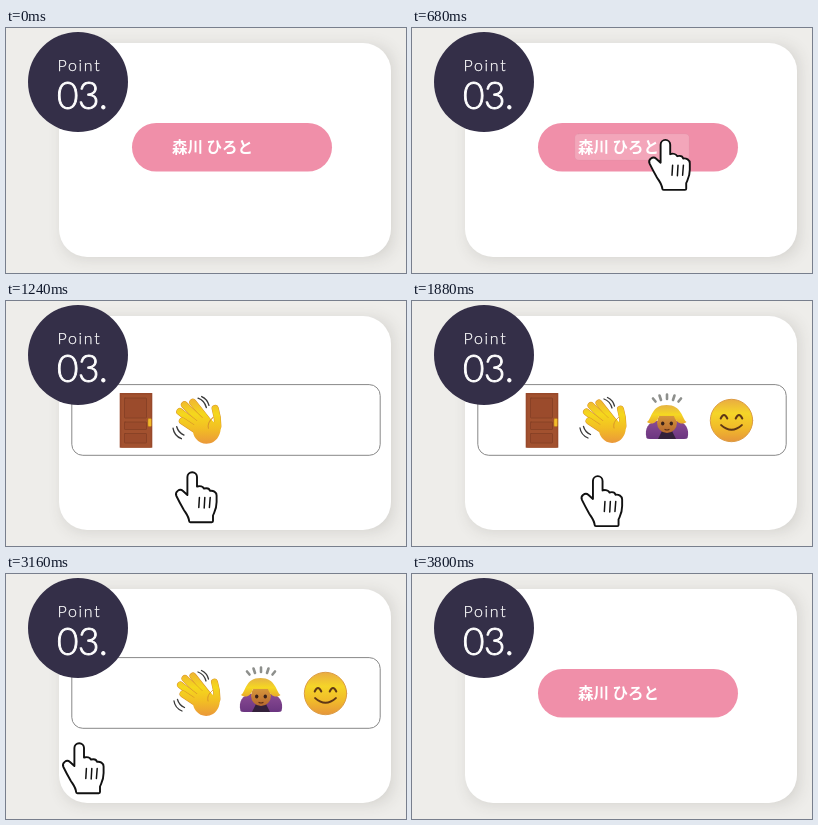
Write an HTML page with a canvas that moves like this. It is 400x245 px and loops after 4000 ms.

```html
<!DOCTYPE html>
<html lang="ja">
<head>
<meta charset="utf-8">
<title>Point 03</title>
<style>
html, body { margin: 0; width: 100%; height: 100%; overflow: hidden; background: #eeedea; }
canvas { display: block; width: 400px; height: 245px; }
</style>
</head>
<body>
<canvas id="stage"></canvas>
<script>
const W = 400, H = 245, LOOP = 4000, TICK = 40;
const canvas = document.getElementById('stage');
const dpr = window.devicePixelRatio || 1;
canvas.width = W * dpr;
canvas.height = H * dpr;
const ctx = canvas.getContext('2d');

const clamp = v => Math.max(0, Math.min(1, v));
const progress = (t, start, length) => clamp((t - start) / length);
const easeInOut = p => p < .5 ? 4 * p ** 3 : 1 - (2 - 2 * p) ** 3 / 2;
const easeOutBack = p => 1 + 1.83 * (p - 1) ** 3 + .83 * (p - 1) ** 2;

// Shape helpers
function rect(x, y, w, h, r, fill, stroke, width = 1) {
  ctx.beginPath();
  ctx.roundRect(x, y, w, h, r);
  paint(fill, stroke, width);
}

function paint(fill, stroke, width) {
  if (fill) { ctx.fillStyle = fill; ctx.fill(); }
  if (stroke) { ctx.strokeStyle = stroke; ctx.lineWidth = width; ctx.stroke(); }
}

function oval(x, y, rx, ry, fill, stroke, width) {
  ctx.beginPath();
  ctx.ellipse(x, y, rx, ry, 0, 0, 7);
  paint(fill, stroke, width);
}

function arc(x, y, r, from, to, color, width) {
  ctx.beginPath();
  ctx.arc(x, y, r, from, to);
  paint(null, color, width);
}

function shape(d, fill, stroke, width) {
  const path = new Path2D(d);
  if (fill) { ctx.fillStyle = fill; ctx.fill(path); }
  if (stroke) { ctx.strokeStyle = stroke; ctx.lineWidth = width; ctx.stroke(path); }
}

function shade(y0, y1, ...colors) {
  const g = ctx.createLinearGradient(0, y0, 0, y1);
  colors.forEach((c, i) => g.addColorStop(i / (colors.length - 1), c));
  return g;
}

function text(str, x, y, font, spacing = 0, outline = 0) {
  ctx.font = font;
  ctx.letterSpacing = spacing + 'px';
  ctx.fillStyle = ctx.strokeStyle = '#fff';
  ctx.fillText(str, x, y);
  if (outline) {
    ctx.lineWidth = outline;
    ctx.strokeText(str, x, y);
  }
}

function scaled(cx, cy, s, draw) {
  ctx.save();
  ctx.translate(cx, cy);
  ctx.scale(s, s);
  ctx.translate(-cx, -cy);
  draw();
  ctx.restore();
}

// Scene parts
function card() {
  ctx.fillStyle = '#eeedea';
  ctx.fillRect(0, 0, W, H);
  ctx.save();
  ctx.shadowColor = 'rgba(60,55,45,.2)';
  ctx.shadowBlur = 18 * dpr;
  ctx.shadowOffsetX = 3 * dpr;
  ctx.shadowOffsetY = 2 * dpr;
  rect(57, 19, 324, 206, 16, '#fff');
  ctx.restore();
  rect(53, 15, 332, 214, 28, '#fff');
}

function badge() {
  oval(72, 54, 50, 50, '#342f48');
  text('Point', 51.5, 42.6, '300 16px Lato, sans-serif', 1.7, .25);
  text('03.', 51, 81, '300 37px Lato, sans-serif', -.4, .9);
}

function pill() {
  rect(126, 95, 200, 48.5, 24.25, '#f08fa9');
  text('森川 ひろと', 166, 125, '700 15.5px "Noto Sans CJK JP", "Noto Sans CJK", sans-serif');
}

function panel(p) {
  ctx.globalAlpha = clamp(p * 1.8);
  scaled(220, 119, easeOutBack(p), () =>
    rect(65.8, 83.6, 308.4, 70.7, 11, '#fff', '#888'));
  ctx.globalAlpha = 1;
}

function door() {
  rect(113.7, 92, 32.6, 54.8, .5, '#98492b');
  rect(115.2, 93.5, 29.6, 53, .5, '#a2512f');
  for (const [y, h] of [[97, 20], [121, 7.5], [132.5, 9.5]]) {
    rect(118.5, y, 22, h, .5, '#9b4b2c', '#843f25', .8);
  }
  rect(142, 117.5, 3.4, 8, 1, '#f3bc2c', '#b97c16', .5);
}

function wave() {
  const skin = shade(99, 142, '#efb532', '#f5d81c', '#f2bd24', '#ea983a');
  const fingers = [
    'M211 125Q211 116 208.5 108', 'M202 121L187 102', 'M198 123L179 104.5',
    'M195 127L174.5 111', 'M195 132L177 120'
  ];
  for (const d of fingers) {
    shape(d, null, '#d9952a', 7);
    shape(d, null, skin, 6);
  }
  shape('M191 120C196 115 203 116 207 121L213.5 122C215 130 212 137 207 140C201 143.5 194 142 190 137C186 132 186 125 191 120Z', skin);
  shape('M206.5 116.5C202.5 120 201 123 202 127', null, '#d9952a', 1);
  shape('M192 98Q198 100 200 107M195.5 96.5Q201 99 202.5 105M168 127Q169 134 176 137M171.5 125.5Q173 131 178.5 133.5',
    null, '#3a3a3a', 1.3);
}

function bow() {
  shape('M234.5 137C232 127 237 121 244 120H266C273 121 278 128 275.5 137Q275 138 272 138H238Q235 138 234.5 137Z',
    shade(120, 138, '#8a4b93', '#6b3580'));
  shape('M246 138L250 130H260L264 138Z', '#33203a');
  oval(255, 121.5, 10, 10.5, shade(111, 132, '#dea03e', '#b5682f'));
  shape('M235 121C240 118 239 104 254.5 104C270 104 270 118 274.5 121C270 124.5 264 122 262 115H247C245 122 240 124.5 235 121Z',
    shade(104, 123, '#e5b345', '#f5d722', '#e9a92b'));
  oval(250.7, 122.5, 1.7, 1.9, '#39211a');
  oval(259.3, 122.5, 1.7, 1.9, '#39211a');
  shape('M253 128.5Q255 129.5 257 128.5', null, '#5d2d18', 1.2);
  shape('M241 97.5L243.5 100.5M247.5 94.5L249 99M255 93.5V98M262.5 94.5L261 99M269 97.5L266.5 100.5',
    null, '#8d8f8c', 2.6);
}

function smile() {
  oval(319.5, 119.5, 21.2, 21.2, shade(98, 141, '#e9ab42', '#f5d528', '#f1bb2a', '#e6953a'), '#dc9c45', 1);
  shape('M308.7 117.5Q312 110.5 315.3 117.5M323.7 117.5Q327 110.5 330.3 117.5', null, '#5f3716', 2);
  shape('M309 124Q319.5 133.5 330 124', null, '#5f3716', 1.7);
}

const emojis = [
  [door, 130, 119], [wave, 191, 120], [bow, 255, 115], [smile, 319.5, 119.5]
];

function emojiRow(t) {
  emojis.forEach(([draw, x, y], i) => {
    const age = t - 1120 - 80 * i;
    if (age < 0 || t >= 3160 + 80 * i) return;
    scaled(x, y, age < 40 ? .7 : age < 80 ? 1.04 : 1, draw);
  });
}

function greenBox() {
  rect(97.2, 88, 61.6, 62.4, 4, '#92c671');
}

function signal() {
  ctx.lineCap = 'butt';
  for (const r of [20, 32, 44]) arc(146, 105, r, -Math.PI / 2, -Math.PI / 6, '#e41b34', 6);
  ctx.lineCap = 'round';
}

function hand(x, y, alpha) {
  ctx.save();
  ctx.globalAlpha = alpha;
  ctx.translate(x, y);
  shape('M12.4 24V6a4.8 4.8 0 0 1 9.6 0V15.5c3-1 6 0 7 2c3-.7 5.5.3 6 2.3c3-.6 6.6 1.3 6.6 4.7V31' +
    'c0 7-2 9.5-3.6 13.5V50q0 1.2-1.2 1.2H15.4q-1.2 0-1.3-1.2C13.8 45.5 11.4 43 8.6 38.5C6 34 3.6 29.5 1.4 25' +
    'C-.4 21 4.5 17 8 20Z', '#fff', '#111', 1.9);
  shape('M24.4 26.5L23.8 36.5M29.8 26.5L29.2 37M35.2 26.5L34.4 36.5', null, '#111', 1.5);
  ctx.restore();
}

// Each move: start, length, destination
const moves = [[160, 280, 237, 110], [640, 280, 169, 170], [1840, 400, 56, 168]];

function pointer(t) {
  if (t < 200 || t >= 3800) return;
  let x = 334, y = 171;
  for (const [start, length, toX, toY] of moves) {
    const k = easeInOut(progress(t, start, length));
    x += (toX - x) * k;
    y += (toY - y) * k;
  }
  // The last move dips before it slides away
  const p = progress(t, 1840, 400);
  y += 4.4 * clamp(p * 10) * (1 - p);
  hand(x, y, clamp((t - 160) / 110) * (1 - progress(t, 3520, 280)));
}

function draw(t) {
  ctx.setTransform(dpr, 0, 0, dpr, 0, 0);
  ctx.lineCap = ctx.lineJoin = 'round';
  card();
  if (t < 920 || t >= 3560) pill();
  const open = t < 3560 ? progress(t, 650, 270) : 1 - progress(t, 3530, 270);
  if (open > 0) panel(open);

  const firstBlink = t >= 2320 && t < 2440;
  if (firstBlink || (t >= 2560 && t < 2760)) greenBox();
  emojiRow(t);
  if (firstBlink || (t >= 2560 && t < 2640)) signal();
  badge();
  pointer(t);
}

function frame() {
  const t = (performance.now() + 1) % LOOP;
  draw(Math.floor(t / TICK) * TICK);
  requestAnimationFrame(frame);
}
frame();
</script>
</body>
</html>
```
